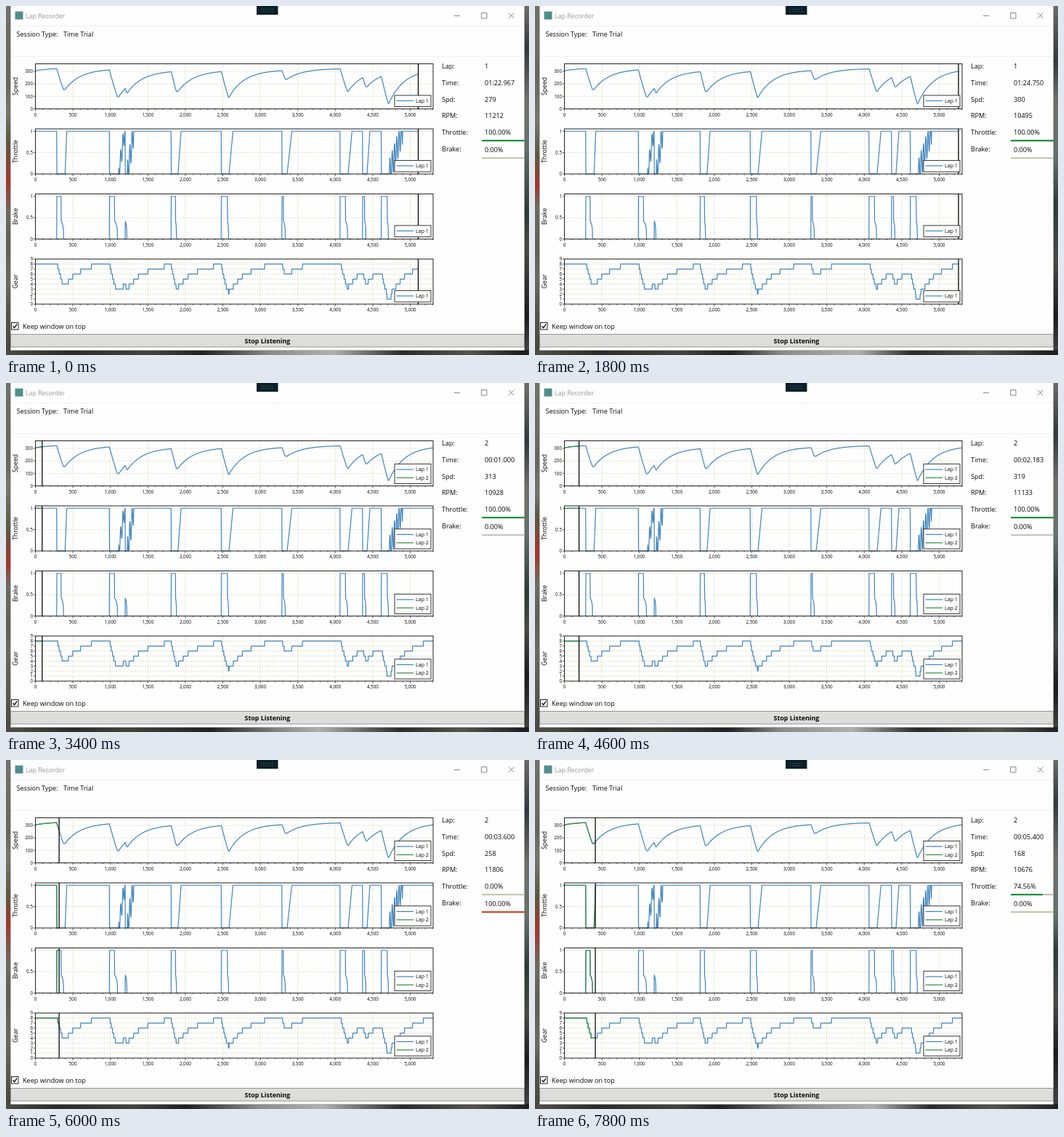
An HTML page that plays this animation: 720x480 px, repeating every 8000 ms.

```html
<!DOCTYPE html>
<html lang="en">
<head>
<meta charset="utf-8">
<title>Lap Recorder</title>
<style>
html, body { margin: 0; width: 100%; height: 100%; overflow: hidden; background: #fefefe; }
svg { display: block; width: 720px; height: 480px; }
text { font: 9.1px "Open Sans", "Noto Sans", sans-serif; fill: #080808; }
.title { font-size: 8.8px; fill: #999; }
.axis { font-size: 8.7px; text-anchor: middle; }
.tick { font-size: 6.3px; }
.mid { text-anchor: middle; }
.end { text-anchor: end; }
.key { font-size: 7.1px; }
.button { font-weight: 700; font-size: 8.9px; text-anchor: middle; }
.line { fill: none; stroke-width: 1.2; stroke-linejoin: round; }
.grid { stroke: #e0e0c4; stroke-dasharray: 2 1.5; }
.tickmark { stroke: #333; stroke-width: .8; }
.glyph { fill: none; stroke: #888; }
</style>
</head>
<body>
<script>
const LEFT = 40.5, RIGHT = 588, HEIGHT = 62, PX_PER_M = 0.1032;
const LOOP = 8000, STEP = 200, LAP_END = 2400;
const BLUE = '#3f85bd', GREEN = '#2f8f3c';

// Corners along the lap; all places are stage x, all speeds km/h.
const fields = ['brake', 'entry', 'release', 'apex', 'min', 'go', 'full'];
const corners = [
  [0, 0, 0, 0, 304.507, 40, 40],
  [69.8, 322.152, 76, 79.2, 155, 81.3, 83.646],
  [142.3, 312, 149.5, 153.5, 96, 155, 163.5],
  [164.2, 163, 164.2, 166.3, 128, 167, 176],
  [227.5, 297, 233.4, 234.6, 140, 236.8, 241],
  [296.5, 298, 305, 306.3, 93, 307, 312.5],
  [380, 306, 382, 384.5, 238, 387, 393.5],
  [460, 320, 467.3, 470.2, 140, 471, 476.3],
  [491, 250, 493.6, 495.5, 177, 497, 501],
  [516.7, 259, 525, 526.3, 43.4, 527, 546],
].map(row => Object.fromEntries(fields.map((f, i) => [f, row[i]])));
const finish = { brake: RIGHT, entry: 304.98 };

const between = (x, a, b) => Math.min(1, Math.max(0, (x - a) / (b - a)));
const cornerIndex = x => corners.findLastIndex(c => c.brake <= x);
const cornerAt = x => corners[cornerIndex(x)];

// Speed falls almost evenly while braking and recovers exponentially.
const PICKUP = 21.5;
const gain = d => 1 - Math.exp(-d / PICKUP);
function speed(x) {
  const i = cornerIndex(x), c = corners[i], next = corners[i + 1] || finish;
  if (x < c.apex) return c.min + (c.entry - c.min) * (1 - between(x, c.brake, c.apex)) ** 1.1;
  if (x < c.go) return c.min;
  return c.min + (next.entry - c.min) * gain(x - c.go) / gain(next.brake - c.go);
}

// A long run back to full throttle is unsteady.
function throttle(x) {
  const c = cornerAt(x), ramp = c.full - c.go;
  if (x >= c.full) return 1;
  const w = between(x, c.go, c.full), unsteady = Math.min(.3, Math.max(0, ramp - 7) * .15);
  return Math.min(1, Math.max(0, w + unsteady * Math.sin(x * 2) * (w > 0)));
}

function brake(x) {
  const c = cornerAt(x);
  if (x >= c.apex) return 0;
  return x < c.release ? 1 : .4238 * (1 - between(x, c.release, c.apex)) ** .25;
}

const shiftSpeeds = [80, 95, 146, 187, 220, 260, 291];
const gear = x => 1 + shiftSpeeds.filter(v => speed(x) >= v).length;

const rpmPerKmh = [130, 95, 75, 61.018, 52.6, 45.757, 40.184, 34.9];
function rpm(x) {
  const wheelSlip = gear(x) <= 4 ? 3.375 * throttle(x) : 0;
  return Math.round(speed(x) * (rpmPerKmh[gear(x) - 1] + wheelSlip));
}

// Key moments of each lap: [ms, lap time in s, cursor x]
const laps = [
  [[0, 82.967, 567.5], [1800, 84.75, 583], [2400, 85.35, 588]],
  [[2400, 0, LEFT], [3400, 1, 49.8], [4600, 2.1834, 60.6], [6000, 3.6, 73.146],
    [6800, 4.3834, 78.2766], [7800, 5.4, 83.0492]],
];
function moment(lap, ms) {
  const i = Math.max(1, lap.findIndex(k => k[0] >= ms)), a = lap[i - 1], b = lap[i];
  const u = between(ms, a[0], b[0]);
  return a.map((v, j) => v + (b[j] - v) * u);
}

const plots = [
  { name: 'Speed', max: 361, ticks: [0, 100, 200, 300], track: speed },
  { name: 'Throttle', max: 1.055, ticks: [0, .5, 1], track: throttle },
  { name: 'Brake', max: 1.055, ticks: [0, .5, 1], track: brake },
  { name: 'Gear', max: 9, ticks: [...Array(10).keys()], track: gear },
];

function add(parent, tag, attrs = {}, content = '') {
  const node = document.createElementNS('http://www.w3.org/2000/svg', tag);
  for (const k in attrs) node.setAttribute(k, attrs[k]);
  node.textContent = content;
  return parent.appendChild(node);
}
const svg = add(document.body, 'svg', { viewBox: '0 0 720 480' });
const rect = (x, y, width, height, attrs, parent = svg) => add(parent, 'rect', { x, y, width, height, ...attrs });
const path = (d, attrs, parent = svg) => add(parent, 'path', { d, ...attrs });
const label = (x, y, content, cls = '', parent = svg) => add(parent, 'text', { x, y, class: cls }, content);

// Blurred scenery showing around the window
const defs = add(svg, 'defs');
function scenery(id, box, colours, vertical) {
  const g = add(defs, 'linearGradient', vertical ? { id, x2: 0, y2: 1 } : { id });
  rect(...box, { fill: `url(#${id})` });
  return colours.map((c, i) => ({
    at: i / (colours.length - 1),
    node: add(g, 'stop', { 'stop-color': c }),
  }));
}
const stops = [
  scenery('sceneLeft', [0, 0, 7, 480], ['#71716a', '#6c6c64', '#66665e', '#77776c', '#5c5a40', '#a03828',
    '#6c6c64', '#5e5e58', '#6a6a62', '#55554e', '#48483f'], true),
  scenery('sceneRight', [713, 0, 7, 480], ['#6b6b66', '#33383c', '#6f6f6a', '#66706a', '#2c3a32', '#4a4a46',
    '#1c1c1c', '#444440'], true),
  scenery('sceneBottom', [0, 473, 720, 7], ['#4c4c44', '#2a2a28', '#44443e', '#202020', '#8a8a86', '#b0b0ac',
    '#2a2a28', '#55554e', '#202020'], false),
].flat();
const noise = n => { const v = Math.sin(n * 12.9898) * 43758.5453; return v - Math.floor(v); };

// Window
rect(6, 0, 708, 473.5, { fill: '#fefefe' });
path('M6.5 0V473.5H713.5V0', { fill: 'none', stroke: '#aaa', 'stroke-width': .8 });
path('M7 27.5H713M7 69.5H713', { stroke: '#f0f0f0' });
rect(345, 0, 29.5, 12, { fill: '#0a2028' });
path('M351 4.5H369M351 7.5H369', { stroke: '#3c5660', 'stroke-dasharray': '1.5 1.5' });
rect(12.5, 7.5, 11, 11, { fill: '#4f8f8a' });
label(27, 17, 'Lap Recorder', 'title');
path('M617 13.5H625M654.5 9.5H662V17H654.5ZM692 9.5L699.5 17M699.5 9.5L692 17', { class: 'glyph' });
label(14.5, 42, 'Session Type:');
label(79, 42, 'Time Trial');
rect(7.5, 435.5, 9.5, 9.5, { fill: '#fff', stroke: '#222' });
path('M9.5 440.2L11.6 442.6L15.2 437.6', { fill: 'none', stroke: '#111', 'stroke-width': 1.4 });
label(23, 443.7, 'Keep window on top');
rect(6.5, 451.5, 707, 17.5, { fill: '#dddddb', stroke: '#808080', 'stroke-width': .8 });
label(360, 464, 'Stop Listening', 'button');

// Readouts
const values = ['Lap', 'Time', 'Spd', 'RPM', 'Throttle', 'Brake'].map((name, i) => {
  const y = 86.3 + i * 22.7;
  label(600, y, name + ':');
  return label(659, y + (name === 'Brake' ? 1.6 : 0), '');
});
const bars = [[184, '#1c9440'], [208, '#d04a20']].map(([y, fill]) => {
  rect(655, y, 59, 2.2, { fill: '#c4c8b4' });
  return rect(655, y, 0, 2.2, { fill });
});

// Charts
const clips = laps.map((_, i) => rect(LEFT, 0, 0, 480, {}, add(defs, 'clipPath', { id: 'lap' + i })));
const cursors = [], legends = [];

function legend(bottom, count) {
  const g = add(svg, 'g'), h = 4 + 11.6 * count;
  rect(535, bottom - 3 - h, 50, h, { fill: '#fefefe', stroke: '#222', 'stroke-width': .9 }, g);
  for (let i = 0; i < count; i++) {
    const y = bottom - 11.2 - (count - 1 - i) * 11.4;
    path(`M537.5 ${y}H561`, { class: 'line', stroke: i ? GREEN : BLUE }, g);
    label(564, y + 2.4, 'Lap ' + (i + 1), 'key', g);
  }
  return g;
}

plots.forEach(({ name, max, ticks, track }, row) => {
  const top = 79.5 + row * 89.5, bottom = top + HEIGHT;
  const yOf = v => bottom - v / max * HEIGHT;
  for (const v of ticks) {
    const y = yOf(v);
    if (v) path(`M${LEFT} ${y}H${RIGHT}`, { class: 'grid' });
    path(`M${LEFT - 2.5} ${y}H${LEFT}`, { class: 'tickmark' });
    label(37, y + 2.3, v, 'tick end');
  }
  for (let m = 0; m <= 5300; m += 100) {
    const x = LEFT + m * PX_PER_M, major = m % 500 === 0;
    path(`M${x} ${bottom}v${major ? 3 : 1.6}`, { class: 'tickmark' });
    if (!major) continue;
    if (m) path(`M${x} ${top}V${bottom}`, { class: 'grid' });
    label(x, bottom + 10, m.toLocaleString('en-US'), 'tick mid');
  }
  add(svg, 'text', { transform: `translate(16 ${top + 31}) rotate(-90)`, class: 'axis' }, name);

  const points = [];
  for (let x = LEFT; x <= RIGHT; x += .25) points.push(`${x} ${yOf(track(x)).toFixed(2)}`);
  [BLUE, GREEN].forEach((stroke, i) =>
    path('M' + points.join('L'), { class: 'line', stroke, 'clip-path': `url(#lap${i})` }));
  rect(LEFT, top, RIGHT - LEFT, HEIGHT, { fill: 'none', stroke: '#222' });
  cursors.push(path(`M0 ${top}V${bottom}`, { stroke: '#080808', 'stroke-width': 1.3 }));
  legends.push([legend(bottom, 1), legend(bottom, 2)]);
});

function clock(seconds) {
  const ms = Math.round(Math.round(seconds * 60) / 60 * 1000);
  const pad = (n, size) => String(n).padStart(size, '0');
  return `${pad(Math.floor(ms / 60000), 2)}:${pad(Math.floor(ms / 1000) % 60, 2)}.${pad(ms % 1000, 3)}`;
}
const percent = v => (v * 100).toFixed(2) + '%';

function render(ms) {
  const lap = ms < LAP_END ? 0 : 1;
  const [, time, x] = moment(laps[lap], ms);

  clips[0].setAttribute('width', (lap ? RIGHT : x) - LEFT);
  clips[1].setAttribute('width', lap ? x - LEFT : 0);
  cursors.forEach(c => c.setAttribute('transform', `translate(${x} 0)`));
  legends.forEach(pair => pair.forEach((l, i) => l.setAttribute('display', i === lap ? 'inline' : 'none')));

  [lap + 1, clock(time), Math.floor(speed(x)), rpm(x), percent(throttle(x)), percent(brake(x))]
    .forEach((v, i) => { values[i].textContent = v; });
  [throttle, brake].forEach((track, i) => bars[i].setAttribute('width', 59 * track(x)));
  stops.forEach((s, i) => s.node.setAttribute('offset', s.at + (noise(i * 7 + ms / STEP) - .5) * .06));
}

let shown = -1;
const start = performance.now();
function tick() {
  const ms = Math.floor((performance.now() - start) % LOOP / STEP) * STEP;
  if (ms !== shown) render(shown = ms);
  requestAnimationFrame(tick);
}
tick();
</script>
</body>
</html>
```
